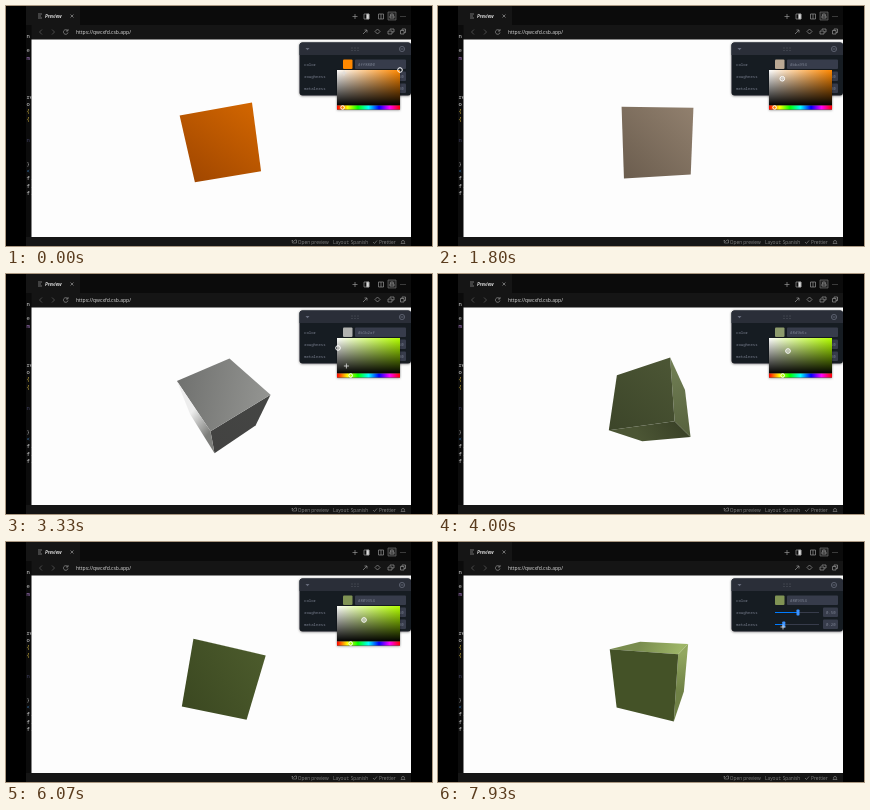
Write an HTML page that moves like this. It is 426x240 px and loops after 8000 ms.

```html
<!DOCTYPE html>
<html lang="en">
<head>
<meta charset="utf-8">
<title>Cube preview</title>
<style>
  html, body { margin: 0; width: 100%; height: 100%; overflow: hidden; background: #000; }
  svg { display: block; width: 100vw; height: 100vh; }
  text { font: 4.8px "Open Sans", "Noto Sans", sans-serif; fill: #808080; }
  .mono text { font: 4px "Noto Sans Mono", monospace; fill: #7c8292; }
  .code text { font: 5.5px "Noto Sans Mono", monospace; }
  .icons { fill: none; stroke: #959595; stroke-width: .7; }
</style>
</head>
<body>
<svg viewBox="0 0 426 240">
  <defs>
    <linearGradient id="saturation"><stop stop-color="#fff"/><stop id="hueStop" offset="1"/></linearGradient>
    <linearGradient id="darkness" x2="0" y2="1"><stop stop-color="#000" stop-opacity="0"/><stop offset="1"/></linearGradient>
    <linearGradient id="rainbow">
      <stop stop-color="#f00"/><stop offset=".167" stop-color="#ff0"/><stop offset=".333" stop-color="#0f0"/>
      <stop offset=".5" stop-color="#0ff"/><stop offset=".667" stop-color="#00f"/>
      <stop offset=".833" stop-color="#f0f"/><stop offset="1" stop-color="#f00"/>
    </linearGradient>
    <clipPath id="sliver"><path d="M20 20h5.500v211h-5.500z"/></clipPath>
    <filter id="shadow" x="-20%" y="-20%" width="140%" height="150%"><feDropShadow dx="0" dy=".5" stdDeviation="1" flood-opacity=".5"/></filter>
  </defs>

  <!-- editor window -->
  <path fill="#151515" d="M20 0h385v240H20z"/>
  <path fill="#0b0b0b" d="M74 0h331v19H74zM20 19h5.500v212h-5.500z"/>
  <path fill="#fdfdfd" d="M25.500 33.500h379.500v197.500H25.500z"/>
  <g class="code" id="code" clip-path="url(#sliver)"></g>
  <text x="39" y="12" style="fill:#eee;font-weight:600;font-style:italic">Preview</text>
  <text x="70" y="28" style="fill:#ddd;font-size:5px">https://qwcxfd.csb.app/</text>
  <g class="icons">
    <path d="M32 8h4M32 10h3M32 12h4M64.500 8.500l3 3m0-3l-3 3"/>
    <path d="M36 23.500l-2.500 2.500 2.500 2.500M46 23.500l2.500 2.500-2.500 2.500" opacity=".6"/>
    <path d="M61.500 24.500a2.300 2.300 0 1 0 .5 2M62 23v2h-2"/>
    <path d="M346.500 10.500h5M349 8v5M372.500 8h5v5h-5zM375 8v5"/>
    <path d="M358 8h5v5h-5z"/><path d="M360.500 8h2.500v5h-2.500z" fill="#ddd"/>
    <path d="M382 6h8v8h-8z" fill="#2c2c2c" opacity=".7"/>
    <path d="M384 12h4v-2h-4zM384.700 10v-2h2.500v2"/>
    <path d="M394.500 10.500h5" stroke-dasharray="1 1"/>
    <path d="M357 28l4-4m-2.500 0h2.500v2.500M371.500 23l2.500 2.500-2.500 2.500-2.500-2.500zM382 25h4v3h-4zM384 24v-1h4v3h-2M394.500 24.500h3.500v3.500h-3.500zM396 24.500v-1.500h3.500v3.500h-1.500"/>
    <path d="M286 234l1.500 1.500 1.500-1.500h1.500v3h-4zM367 236l1.500 1.500 2.500-3M395 237.500h4l-.7-1v-1.500q-1.300-1.500-2.600 0v1.500z" opacity=".8"/>
  </g>
  <text x="291.800" y="237.500">Open preview</text>
  <text x="327" y="237.500">Layout: Spanish</text>
  <text x="373" y="237.500">Prettier</text>

  <g id="cube"></g>

  <!-- material controls -->
  <g filter="url(#shadow)">
    <rect x="293.500" y="36.500" width="111.500" height="53" rx="3" fill="#181c20"/>
    <path d="M293.500 49V39.500q0-3 3-3h105.500q3 0 3 3v9.500z" fill="#292d39"/>
  </g>
  <path d="M299.500 42h4l-2 2.300z" fill="#666b7a"/>
  <path d="M345.500 42h8M345.500 44.500h8" stroke="#535760" stroke-dasharray="1 2"/>
  <g fill="none" stroke="#666b7a" stroke-width=".8"><circle cx="396" cy="43" r="2.600"/><path d="M394.500 43h3"/></g>
  <g class="mono">
    <text x="298" y="59.500">color</text>
    <text x="298" y="71.800">roughness</text>
    <text x="298" y="83.800">metalness</text>
    <rect id="swatch" x="337" y="53.500" width="9.500" height="9.500" rx="1"/>
    <rect x="349" y="53.500" width="51" height="9.500" rx="1" fill="#373c4b"/>
    <text id="hex" x="352" y="59.800"></text>
    <rect x="385" y="65.500" width="15" height="9.500" rx="1" fill="#373c4b"/>
    <rect x="385" y="77.500" width="15" height="9.500" rx="1" fill="#373c4b"/>
    <text x="388" y="71.800">0.50</text>
    <text id="metalText" x="388" y="83.800"></text>
    <path d="M337 70.500h44M337 82.500h44" stroke="#373c4b"/>
    <path d="M337 70.500h23" stroke="#007bff"/>
    <rect x="358.500" y="67.500" width="3" height="6" rx=".8" fill="#3c93ff"/>
    <path id="metalFill" stroke="#007bff"/>
    <rect id="metalKnob" y="79.500" width="3" height="6" rx=".8" fill="#3c93ff"/>
  </g>
  <g id="picker">
    <g filter="url(#shadow)"><rect x="331" y="64" width="63" height="39.500" fill="#111"/></g>
    <rect x="331" y="64" width="63" height="35.500" fill="url(#saturation)"/>
    <rect x="331" y="64" width="63" height="35.500" fill="url(#darkness)"/>
    <rect x="331" y="99.500" width="63" height="4" fill="url(#rainbow)"/>
    <g fill="none" stroke="#fff">
      <circle id="hueKnob" cy="101.500" r="1.800"/>
      <circle id="knob" r="2.300"/>
    </g>
  </g>
  <path id="mouse" d="M-2.500 0h5M0-2.500v5" stroke="#ddd" stroke-width=".8"/>
</svg>

<script>
const $ = id => document.getElementById(id);
const svgNode = (tag, parent, attrs = {}) => {
  const node = document.createElementNS('http://www.w3.org/2000/svg', tag);
  set(node, attrs);
  return parent.appendChild(node);
};
function set(node, attrs) {
  for (const key in attrs) node.setAttribute(key, attrs[key]);
}
const clamp = (v, lo = 0, hi = 1) => Math.min(hi, Math.max(lo, v));
const dot = (a, b) => a[0] * b[0] + a[1] * b[1] + a[2] * b[2];
const add = (a, b, s = 1) => a.map((v, i) => v + b[i] * s);

// Visible right edge of the code pane.
[[32, 'n', '#ddd'], [46, 'e', '#bbb'], [54, 'm', '#b07fd0'], [93, 're', '#ccc'], [100, 'o', '#ddd'], [107, '{', '#e0c040'],
 [115, '{', '#e0c040'], [136, 'n', '#446'], [160, '}', '#aaa'], [167, '<', '#48c'], [174, 'f.', '#ddd'], [182, 'f.', '#ddd'], [189, 'f.', '#ddd']]
  .forEach(([y, label, color]) => {
    const node = svgNode('text', $('code'), { x: 20.5, y, style: `fill:${color}` });
    node.textContent = label;
  });

// Seconds, picker x, picker y, hue, light gain
const PICK = [
  [0, 394, 64, 32, 1.2], [.2, 394, 64, 32, 1.2], [.27, 340, 67, 32, 1.05], [.93, 371, 70, 32, 1],
  [2.2, 332, 74, 32, 1], [2.9, 332, 74, 32, .95], [3.25, 332, 74, 78, .9], [3.5, 332, 74, 78, .88],
  [4, 350, 77, 78, .85], [5, 369, 65, 78, 1.12], [6.07, 358, 78, 78, .95], [7, 358, 78, 78, .95],
  [7.9, 358, 78, 78, 1.4]
];
// Seconds, mouse x, mouse y
const MOUSE = [
  [0, 338, 67], [.27, 340, 67], [.93, 371, 70], [2.2, 332, 74], [2.45, 332, 74], [2.73, 338, 97],
  [2.9, 337, 101], [3.25, 344.600, 101], [3.5, 332, 74], [4, 350, 77], [5, 369, 65], [6.07, 358, 78],
  [6.9, 371, 85], [7.9, 345, 85]
];
function sample(track, t) {
  const i = track.findIndex(key => key[0] > t);
  if (i < 0) return track.at(-1).slice(1);
  const [a, b] = [track[i - 1], track[i]];
  const u = (t - a[0]) / (b[0] - a[0]);
  return a.map((v, k) => v + (b[k] - v) * u).slice(1);
}

function hsv(hue, s, v) {
  return [5, 3, 1].map(n => {
    const k = (n + hue / 60) % 6;
    return 255 * v * (1 - s * clamp(Math.min(k, 4 - k)));
  });
}
const rgb = color => `rgb(${color.map(c => Math.round(clamp(c, 0, 255)))})`;

// Half a cube edge is one unit.
const FOCAL = 130.4, DISTANCE = 4.7, CENTER = [215.900, 132.400], LIGHT = 4;
const project = p => {
  const scale = FOCAL / (DISTANCE - p[2]);
  return [CENTER[0] + p[0] * scale, CENTER[1] - p[1] * scale];
};

const faces = [0, 1, 2].map(i => {
  const gradient = svgNode('linearGradient', $('cube'), { id: 'face' + i, gradientUnits: 'userSpaceOnUse' });
  const stops = [0, 1].map(offset => svgNode('stop', gradient, { offset }));
  const polygon = svgNode('polygon', $('cube'), { fill: `url(#face${i})` });
  return { gradient, stops, polygon };
});

// Two opposite point lights with falloff; the rear one leaves a white sheen.
function shade(normal, point) {
  const lit = sign => {
    const ray = point.map(v => sign * LIGHT - v);
    const reach = Math.hypot(...ray);
    return Math.max(0, dot(normal, ray) / reach * LIGHT * Math.sqrt(3) / reach);
  };
  const rear = lit(-1);
  return { light: .4 + .5 * lit(1) + 1.1 * rear, sheen: clamp((rear - .4) * 2.6, 0, .85) };
}

// Dim light deepens the saturation as well as the brightness.
function tint(color, { light, sheen }, gain) {
  const level = light * gain, peak = Math.max(...color);
  const power = 1 + .8 * clamp(1 - level);
  return rgb(color.map(v => {
    const base = Math.min(255, peak * (v / peak) ** power * level);
    return base + (255 - base) * sheen;
  }));
}

function drawCube(angle, color, gain) {
  const c = Math.cos(angle), s = Math.sin(angle);
  const axes = [[c, s * s, -s * c], [0, c, s], [s, -c * s, c * c]];
  faces.forEach(({ gradient, stops, polygon }, i) => {
    const sign = axes[i][2] < 0 ? -1 : 1;
    const normal = axes[i].map(v => v * sign);
    const shown = normal[2] > 1 / DISTANCE;
    set(polygon, { display: shown ? 'inline' : 'none' });
    if (!shown) return;
    const u = axes[(i + 1) % 3], v = axes[(i + 2) % 3];
    const corners = [[1, 1], [1, -1], [-1, -1], [-1, 1]].map(([a, b]) => add(add(normal, u, a), v, b));
    const shades = corners.map(p => shade(normal, p));
    const near = shades.reduce((best, q, k) => q.light > shades[best].light ? k : best, 0);
    const far = (near + 2) % 4;
    const points = corners.map(project);
    set(polygon, { points: points.join(' ') });
    set(gradient, { x1: points[near][0], y1: points[near][1], x2: points[far][0], y2: points[far][1] });
    set(stops[0], { 'stop-color': tint(color, shades[near], gain) });
    set(stops[1], { 'stop-color': tint(color, shades[far], gain) });
  });
}

function render(ms) {
  const t = Math.floor((ms + 5) * .015) % 120 / 15; // 15 pictures a second
  const [x, y, hue, gain] = sample(PICK, t);
  const color = hsv(hue, clamp((x - 331) / 63), clamp(1 - (y - 64) / 33));
  drawCube((100 + 148.800 * t) * Math.PI / 180, color, gain);

  set($('swatch'), { fill: rgb(color) });
  $('hex').textContent = '#' + color.map(v => Math.round(v).toString(16).padStart(2, '0')).join('');
  set($('picker'), { display: t < 6.8 ? 'inline' : 'none' });
  set($('hueStop'), { 'stop-color': rgb(hsv(hue, 1, 1)) });
  set($('knob'), { cx: x, cy: y });
  set($('hueKnob'), { cx: 331 + hue / 360 * 63 });

  const metal = .8 - .6 * clamp(t - 6.9);
  const metalX = 337 + 44 * metal;
  set($('metalFill'), { d: `M337 82.500H${metalX}` });
  set($('metalKnob'), { x: metalX - 1.5 });
  $('metalText').textContent = metal.toFixed(2);

  const [mx, my] = sample(MOUSE, t);
  set($('mouse'), { transform: `translate(${mx} ${my})` });
}

function tick() {
  render(performance.now() % 8000);
  requestAnimationFrame(tick);
}
tick();
</script>
</body>
</html>
```
